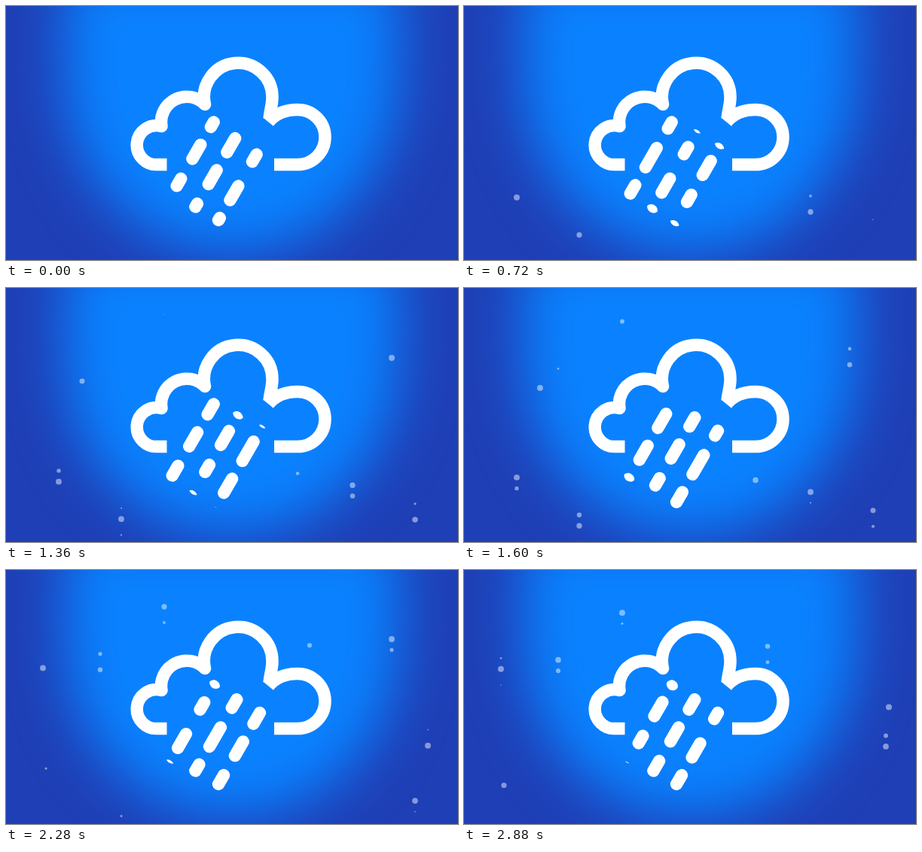
Animation of 600x338 px, one loop 2.92 s. Source, as an HTML page:

```html
<!DOCTYPE html>
<html lang="en">
<head>
<meta charset="utf-8">
<title>Rain cloud</title>
<style>
  html, body { margin: 0; height: 100%; overflow: hidden; background: #1f3fb6; }
  svg { display: block; width: 100vw; height: 100vh; }
  .cloud, #rain { fill: none; stroke: #fff; stroke-width: 16.5; }
  .cloud { stroke-linejoin: round; }
  #rain { stroke-linecap: round; stroke-dasharray: 11 37.5 21.5 27.5 21.5 30 29.5 27.5 21.5 30.5; }
  #dots { fill: #fff; fill-opacity: .47; }
</style>
</head>
<body>
<svg viewBox="0 0 600 338" preserveAspectRatio="none">
  <defs>
    <filter id="soft" filterUnits="userSpaceOnUse" x="-150" y="-200" width="900" height="740"
      color-interpolation-filters="sRGB"><feGaussianBlur stdDeviation="36"/></filter>
    <clipPath id="tube"><rect x="-8.4" width="16.8" height="126" rx="8.4"/></clipPath>
  </defs>
  <rect width="600" height="338" fill="#1f3fb6"/>
  <path d="M78 -45H522V95A222 234 0 0 1 78 95Z" fill="#0a82ff" filter="url(#soft)"/>
  <g id="dots"></g>
  <path class="cloud" d="M213.5 211H202A26 26 0 1 1 206.5 160A33.7 33.7 0 0 1 264 131
    A45.3 45.3 0 1 1 353.5 121.5C353.5 132 350.5 139 349.5 150"/>
  <path class="cloud" d="M348.5 154.5C357 144 370 138 387 138A36.5 36.5 0 0 1 387 211H356"/>
  <g id="rain" transform="translate(279.7 147.5) rotate(30)"></g>
</svg>
<script>
  const LOOP = 2920, STEP = 40;
  const RAIN_SPEED = 0.086, LANE_GAP = 35.4;
  const DOT_SPEED = 0.0375, DOT_LIFE = 1120, BIRTH_GAP = 165;

  const add = (parent, tag, attrs) => {
    const el = document.createElementNS('http://www.w3.org/2000/svg', tag);
    for (const k in attrs) el.setAttribute(k, attrs[k]);
    return parent.appendChild(el);
  };

  // one dashed line per lane, each starting at its own phase
  const lanes = [135, 4, 57].map((phase, i) => {
    const g = add(rain, 'g', { transform: `translate(${i * LANE_GAP})`, 'clip-path': 'url(#tube)' });
    return { line: add(g, 'line', { x1: 0, y1: -40, x2: 0, y2: 170 }), phase };
  });

  // where dots appear, in order of birth
  const sources = [
    [460, 247], [70, 234], [153, 290], [173, -38], [543, 282],
    [512, 73], [101, 110], [387, 239], [210, 34], [125, 103],
    [560, 210], [49, 113], [403, 89], [53, 259], [564, 161]
  ];
  // most sources release three dots, some later ones a single dot
  const burst = i => i > 5 && (i + 1) % 7 < 2 ? [0] : [0, 565, 950];
  const dotList = sources.flatMap(([x, y], i) =>
    burst(i).map(delay => ({ el: add(dots, 'circle', { cx: x }), y, birth: i * BIRTH_GAP + delay })));

  function draw() {
    const t = Math.floor(performance.now() % LOOP / STEP) * STEP;
    for (const { line, phase } of lanes)
      line.setAttribute('stroke-dashoffset', -(phase + t * RAIN_SPEED));
    for (const { el, y, birth } of dotList) {
      const age = t - birth;
      const swell = Math.sin(Math.PI * Math.min(1, Math.max(0, age / DOT_LIFE)));
      el.setAttribute('r', 4 * Math.max(0, swell) ** 0.9);
      el.setAttribute('cy', y + age * DOT_SPEED);
    }
    requestAnimationFrame(draw);
  }
  draw();
</script>
</body>
</html>
```
